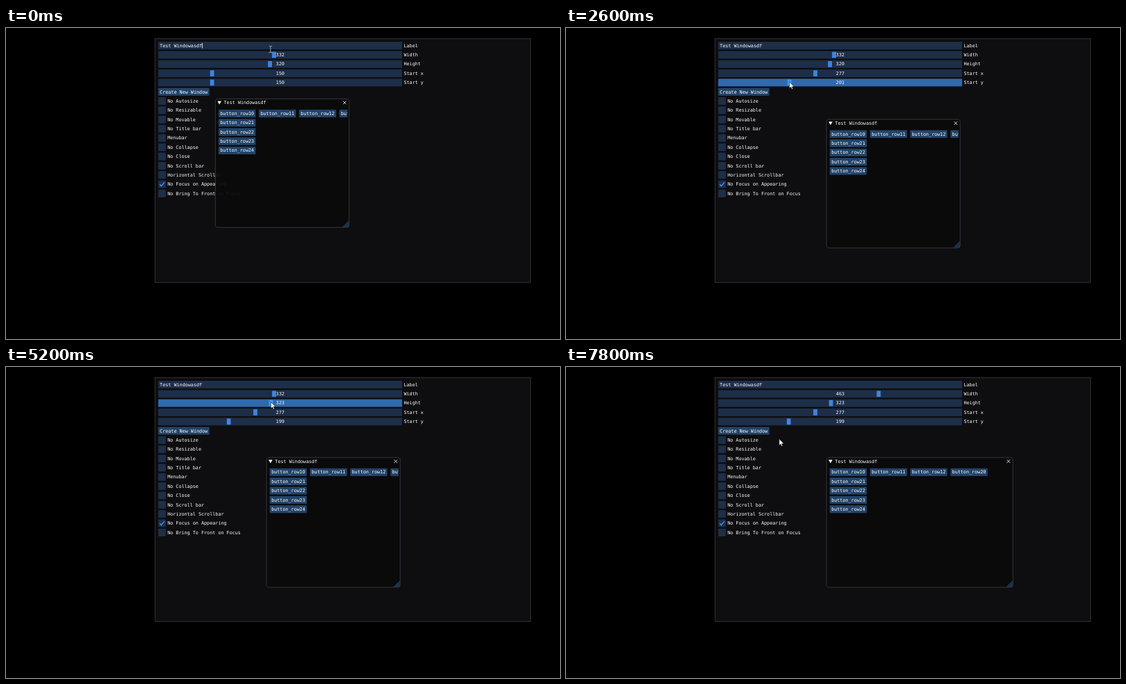
Write an HTML page that moves like this. It is 800 px wide and 450 px high and loops after 8 s.

```html
<!DOCTYPE html>
<html lang="en">
<head>
<meta charset="utf-8">
<title>Window settings</title>
<style>
html, body { margin: 0; width: 100%; height: 100%; overflow: hidden; background: #000; }
svg { display: block; width: 100vw; height: 100vh; }
text {
  font: 11.63px "DejaVu Sans Mono", monospace;
  fill: #fff;
  white-space: pre;
  text-rendering: geometricPrecision;
}
.mid { text-anchor: middle; }
.border { fill: none; stroke: #6e6e80; stroke-opacity: .62; stroke-width: 1.2; }
</style>
</head>
<body>
<svg id="stage" viewBox="0 0 1376 774">
  <defs><clipPath id="inner"><rect id="clip" x="0" y="19"/></clipPath></defs>
</svg>
<script>
const LOOP = 8000, STEP = 200, LAG = 20;
const MAIN = { x: 370, y: 26.3, w: 933, h: 607 };
const LEFT = MAIN.x + 8, FIELD = 606, BOX = 19, PITCH = 23;
const COLOR = { frame: '#1d2e48', hover: '#234469', active: '#3069ac', grab: '#3d85e0', bright: '#4296fa' };
const stage = document.getElementById('stage');
const clip = document.getElementById('clip');

function add(parent, tag, attrs, label) {
  const el = document.createElementNS('http://www.w3.org/2000/svg', tag);
  set(el, attrs);
  if (label !== undefined) el.textContent = label;
  parent.appendChild(el);
  return el;
}
function set(el, attrs) {
  for (const k in attrs) el.setAttribute(k, attrs[k]);
}
const rect = (p, x, y, width, height, fill) => add(p, 'rect', { x, y, width, height, fill });
const write = (p, x, top, s) => add(p, 'text', { x, y: top + 13.3 }, s);
const rowTop = i => MAIN.y + 8 + PITCH * i;

function button(p, x, y, s) {
  rect(p, x, y, s.length * 7 + 8, BOX, COLOR.hover);
  write(p, x + 4, y, s);
}

// Main panel
rect(stage, MAIN.x, MAIN.y, MAIN.w, MAIN.h, '#0e0d0f');
add(stage, 'rect', { class: 'border', x: MAIN.x, y: MAIN.y, width: MAIN.w, height: MAIN.h });

rect(stage, LEFT, rowTop(0), FIELD, BOX, COLOR.frame);
write(stage, LEFT + 4, rowTop(0), 'Test Windowasdf');
write(stage, LEFT + FIELD + 4, rowTop(0), 'Label');
const caret = rect(stage, LEFT + 109, rowTop(0) + 3, 1.4, 13, '#fff');

const sliders = ['Width', 'Height', 'Start x', 'Start y'].map((name, i) => {
  const top = rowTop(i + 1);
  const bar = rect(stage, LEFT, top, FIELD, BOX, COLOR.frame);
  const grab = rect(stage, 0, top + 2, 10, 15, COLOR.grab);
  const value = write(stage, LEFT + FIELD / 2, top, '');
  value.setAttribute('class', 'mid');
  write(stage, LEFT + FIELD + 4, top, name);
  return { top, bar, grab, value };
});

button(stage, LEFT, rowTop(5), 'Create New Window');

['No Autosize', 'No Resizable', 'No Movable', 'No Title bar', 'Menubar', 'No Collapse',
 'No Close', 'No Scroll bar', 'Horizontal Scrollbar', 'No Focus on Appearing',
 'No Bring To Front on Focus'].forEach((name, i) => {
  const top = rowTop(i + 6);
  rect(stage, LEFT, top, BOX, BOX, COLOR.frame);
  write(stage, LEFT + BOX + 4, top, name);
  if (name === 'No Focus on Appearing') {
    add(stage, 'path', {
      d: `M${LEFT + 3.8} ${top + 9.8}l3.8 4.2l8-9.5`,
      fill: 'none', stroke: COLOR.bright, 'stroke-width': 2.4
    });
  }
});

// Floating window
const win = add(stage, 'g', {});
const body = add(win, 'rect', { rx: 7, fill: '#0a0a0b', 'fill-opacity': .94 });
const title = add(win, 'path', { fill: '#0a0a0a' });
add(win, 'path', { d: 'M5.2 5.6h9.6l-4.8 8.6z', fill: '#fff' });
write(win, 21, 0, 'Test Windowasdf');
const close = add(win, 'path', { d: 'M-4 -4L4 4M4 -4L-4 4', stroke: '#fff', 'stroke-width': 1.4 });
const content = add(win, 'g', { 'clip-path': 'url(#inner)' });
['10', '11', '12', '20'].forEach((n, i) => button(content, 8 + 100 * i, 27, 'button_row' + n));
['21', '22', '23', '24'].forEach((n, i) => button(content, 8, 50 + PITCH * i, 'button_row' + n));
const grip = add(win, 'path', { d: 'M0 0V-16L-16 0z', fill: '#1b3150' });
const edge = add(win, 'rect', { class: 'border', rx: 7 });

// Pointers
const beam = add(stage, 'path', {
  d: 'M-4 -8H-1L0 -7L1 -8H4M0 -7V7M-4 8H-1L0 7L1 8H4',
  fill: 'none', stroke: '#c8ccd2', 'stroke-width': 1.3
});
const arrow = add(stage, 'path', {
  d: 'M0 0V16.4L3.7 12.9L6.2 18.4L8.8 17.2L6.4 12H11.6z',
  fill: '#fff', stroke: '#000', 'stroke-width': 1
});

// Motion: [time, value...] points joined by straight lines
const values = [
  [[6000, 332], [7000, 462], [7200, 467], [7380, 463]],
  [[3980, 320], [4150, 317], [4600, 317], [5150, 323]],
  [[1180, 150], [1800, 243], [2000, 324], [2380, 277]],
  [[2500, 150], [2540, 201], [2600, 201], [3000, 288], [3580, 199]]
];
const pointer = [
  [0, 657, 53], [600, 586, 135], [1000, 520, 114], [1200, 522, 113], [1800, 595, 115],
  [2000, 660, 115], [2400, 619, 115], [2600, 555, 134], [3000, 629, 136], [3600, 553, 135],
  [4000, 656, 88], [4200, 653, 86.5], [5200, 658, 87], [5400, 658, 87], [5800, 663.5, 71],
  [6000, 666, 71], [7000, 776, 70], [7200, 780, 70], [7400, 777, 70], [7800, 529.5, 179]
];
const drags = [[6000, 7400], [4000, 5400], [1200, 2400], [2600, 3700]];

function at(keys, t) {
  const i = keys.findIndex(k => k[0] >= t);
  if (i < 0) return keys[keys.length - 1].slice(1);
  if (i === 0) return keys[0].slice(1);
  const a = keys[i - 1], b = keys[i], f = (t - a[0]) / (b[0] - a[0]);
  return a.slice(1).map((v, j) => v + (b[j + 1] - v) * f);
}

function draw(ms) {
  const t = Math.floor(ms / STEP) * STEP;
  const [mx, my] = at(pointer, t);
  const dragging = drags.findIndex(d => t >= d[0] && t < d[1]);

  sliders.forEach((s, i) => {
    const v = Math.round(at(values[i], t)[0]);
    const active = dragging === i;
    const over = dragging < 0 && my >= s.top && my < s.top + BOX && mx >= LEFT && mx < LEFT + FIELD;
    s.bar.setAttribute('fill', active ? COLOR.active : over ? COLOR.hover : COLOR.frame);
    set(s.grab, { x: LEFT + 2 + v / 700 * (FIELD - 14), fill: active ? COLOR.bright : COLOR.grab });
    s.value.textContent = v;
  });

  // The window follows its sliders one tick late
  const [width, height, x, y] = values.map(k => Math.round(at(k, t - LAG)[0]));
  win.setAttribute('transform', `translate(${MAIN.x + x} ${MAIN.y + y})`);
  set(body, { width, height });
  set(edge, { width, height });
  set(clip, { width: width - 4, height: height - 19 });
  title.setAttribute('d', `M0 19V7Q0 0 7 0H${width - 7}Q${width} 0 ${width} 7V19z`);
  close.setAttribute('transform', `translate(${width - 11} 9.5)`);
  grip.setAttribute('transform', `translate(${width - 1} ${height - 1})`);

  caret.setAttribute('visibility', t < 1200 ? 'visible' : 'hidden');
  const typing = my <= rowTop(0) + BOX;
  set(beam, { transform: `translate(${mx} ${my})`, visibility: typing ? 'visible' : 'hidden' });
  set(arrow, { transform: `translate(${mx} ${my})`, visibility: typing ? 'hidden' : 'visible' });
}

const start = performance.now();
function tick() {
  draw((performance.now() - start) % LOOP);
  requestAnimationFrame(tick);
}
tick();
</script>
</body>
</html>
```
